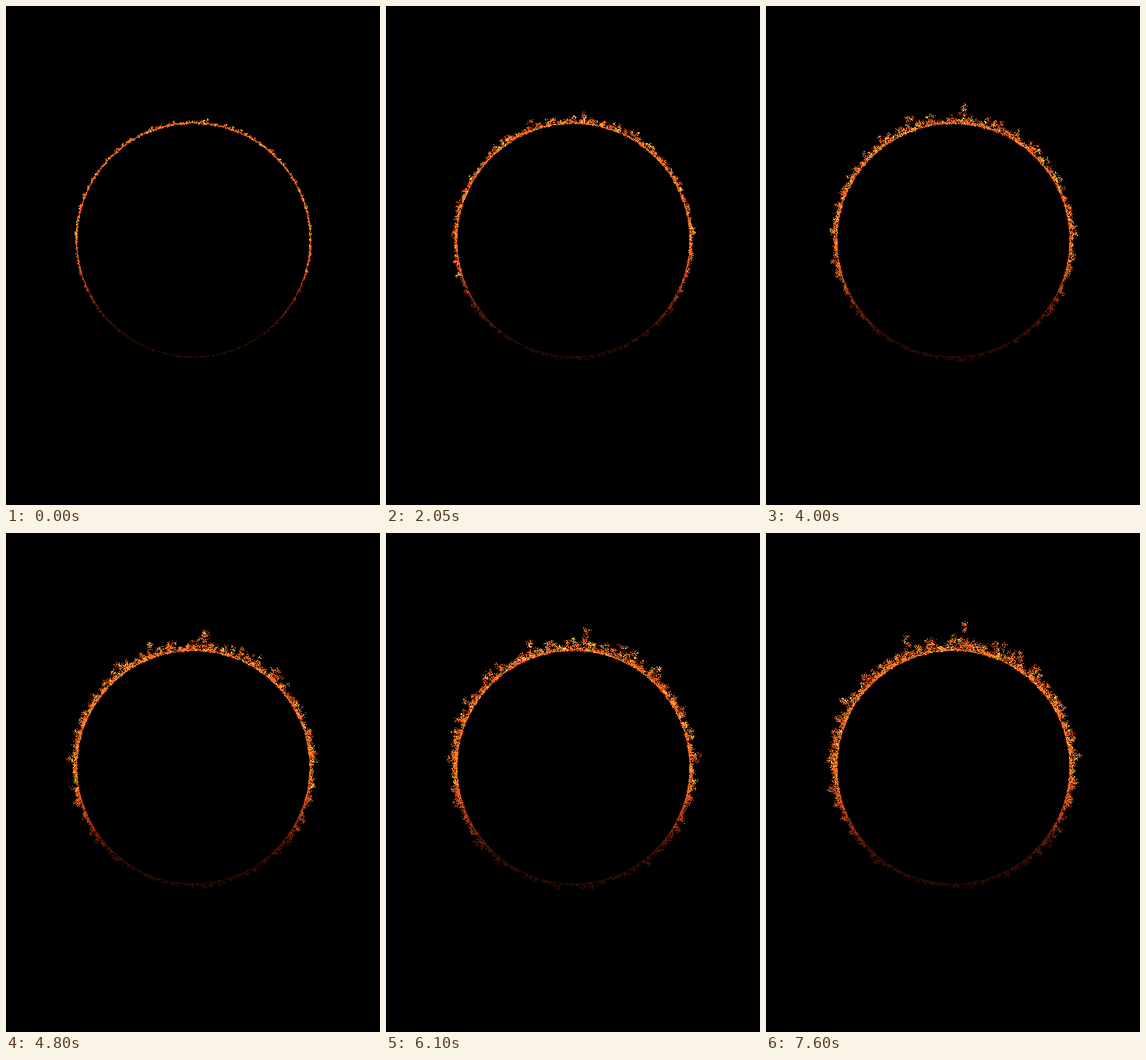
An HTML page with a canvas that plays this animation: 480x640 px, repeating every 7650 ms.

```html
<!DOCTYPE html>
<html lang="en">
<head>
<meta charset="utf-8">
<title>Ring of fire</title>
<style>
html, body { margin: 0; width: 100%; height: 100%; overflow: hidden; background: #000; }
canvas { display: block; width: 480px; height: 640px; }
</style>
</head>
<body>
<canvas id="stage" width="480" height="640"></canvas>
<script>
const ctx = document.getElementById('stage').getContext('2d', { alpha: false });
const STEP = 50, STEPS = 153, CX = 240.5, CY = 300.5, R = 149.5, TAU = Math.PI * 2;
const TONGUES = 170;

// Repeatable random number in 0..1 for a pair of integers
function rnd(a, b) {
  let h = Math.imul(a + 1, 0x9E3779B1) ^ Math.imul(b + 7, 0x85EBCA6B);
  h = Math.imul(h ^ (h >>> 15), 0x2C1B3C6D);
  h = Math.imul(h ^ (h >>> 12), 0x297A2D39);
  return ((h ^ (h >>> 15)) >>> 0) / 4294967296;
}
const bell = (a, b) => rnd(a, b) + rnd(a, b + 1) + rnd(a, b + 2) - 1.5;
const clamp = x => Math.min(1, Math.max(0, x));
const smooth = (a, b, x) => {
  x = clamp((x - a) / (b - a));
  return x * x * (3 - 2 * x);
};
const topness = a => (1 - Math.sin(a)) / 2;
const heatAt = a => smooth(0.02, 0.5, topness(a));

// Fire colour from deep red (0) to pale yellow (1)
function fire(warm, light) {
  const w = clamp(warm);
  const c = [255 * Math.min(1, 0.45 + 1.9 * w), 28 + 222 * w ** 1.25, 8 + 60 * w + 130 * smooth(0.9, 1, w)];
  return `rgb(${c.map(v => Math.round(v * light))})`;
}

function pixel(x, y) {
  if (Math.hypot(x - CX, y - CY) > R - 0.6) ctx.fillRect(Math.floor(x), Math.floor(y), 1, 1);
}

// Two tall plumes near the top: angle in degrees and final height
const plumes = [[-85, 35], [-110, 27]].map(([deg, height], i) => ({
  id: TONGUES + i, a: deg * TAU / 360, height, width: 4, plume: true
}));
const tongues = Array.from({ length: TONGUES }, (_, id) => {
  const a = TAU * (id + rnd(id, 1)) / TONGUES;
  const skew = 0.2 + 0.8 * rnd(id, 2) ** 1.5;
  return { id, a, height: 23 * skew * (0.35 + 0.65 * topness(a)), width: 3.5, plume: false };
}).concat(plumes);

function rim(n) {
  const count = 1500;
  for (let i = 0; i < count; i++) {
    const a = TAU * i / count, heat = heatAt(a), top = topness(a);
    const beat = Math.floor(n / 9 + rnd(i, 1)), q = rnd(i, 100 + beat);
    const r = R + rnd(i, 300 + beat) * 2 * top * heat;
    ctx.fillStyle = fire(0.08 + heat * (0.2 + 0.5 * q * q), 0.4 + 0.6 * heat - 0.3 * (1 - heat) * q);
    pixel(CX + Math.cos(a) * r, CY + Math.sin(a) * r);
  }
}

// An ember is a small loose cluster of pixels in one colour
function ember(id, gen, x, y, size, n) {
  const beat = gen * 40 + Math.floor(n / 6) % 2;
  for (let i = 0; i < 8; i++) {
    const k = id * 8 + i;
    pixel(x + bell(k, beat) * size, y + bell(k, beat + 10) * size);
  }
}

function tongue(t, n, p) {
  const grow = p ** 0.6, heat = heatAt(t.a);
  const sway = Math.sin(n / 17 + rnd(t.id, 9) * TAU);
  const reach = t.height * (0.2 + 0.8 * p ** 0.75) * (1 + 0.08 * sway);
  const count = Math.round((3 + 8 * grow) * (0.3 + 0.7 * heat));
  const cos = Math.cos(t.a), sin = Math.sin(t.a);

  for (let i = 0; i < count; i++) {
    const id = t.id * 32 + i, clock = n / (14 + 20 * rnd(id, 1)) + rnd(id, 2);
    const gen = Math.floor(clock), age = clock - gen, k = 20 + gen * 16;
    const tip = t.plume && i % 2 ? 1 - 0.35 * rnd(id, k) : rnd(id, k) ** 1.3;
    const d = R + Math.max(0.4, reach * tip + (age - 0.5) * 2 * p);
    const side = bell(id, k + 1) * t.width;
    const flick = rnd(id, 900 + Math.floor(n / 3));
    const spark = rnd(id, k + 5) < 0.16 ? 0.4 : 0;
    const shade = rnd(id, k + 6) < 0.14 ? 0.4 : 1;
    ctx.fillStyle = fire(
      0.05 + heat * (0.2 + 0.27 * rnd(id, k + 7) + spark + 0.1 * flick),
      shade * (0.36 + 0.64 * heat)
    );
    ember(id, gen, CX + cos * d - sin * side, CY + sin * d + cos * side, 1.5 + 1.5 * grow, n);
  }
}

function draw(n) {
  const p = n / (STEPS - 1);
  ctx.fillStyle = '#000';
  ctx.fillRect(0, 0, 480, 640);
  for (const t of tongues) tongue(t, n, p);
  rim(n);
}

const start = performance.now();
let last = -1;
function tick() {
  const n = Math.floor(Math.max(0, performance.now() - start) / STEP) % STEPS;
  if (n !== last) draw(last = n);
  requestAnimationFrame(tick);
}
tick();
</script>
</body>
</html>
```
